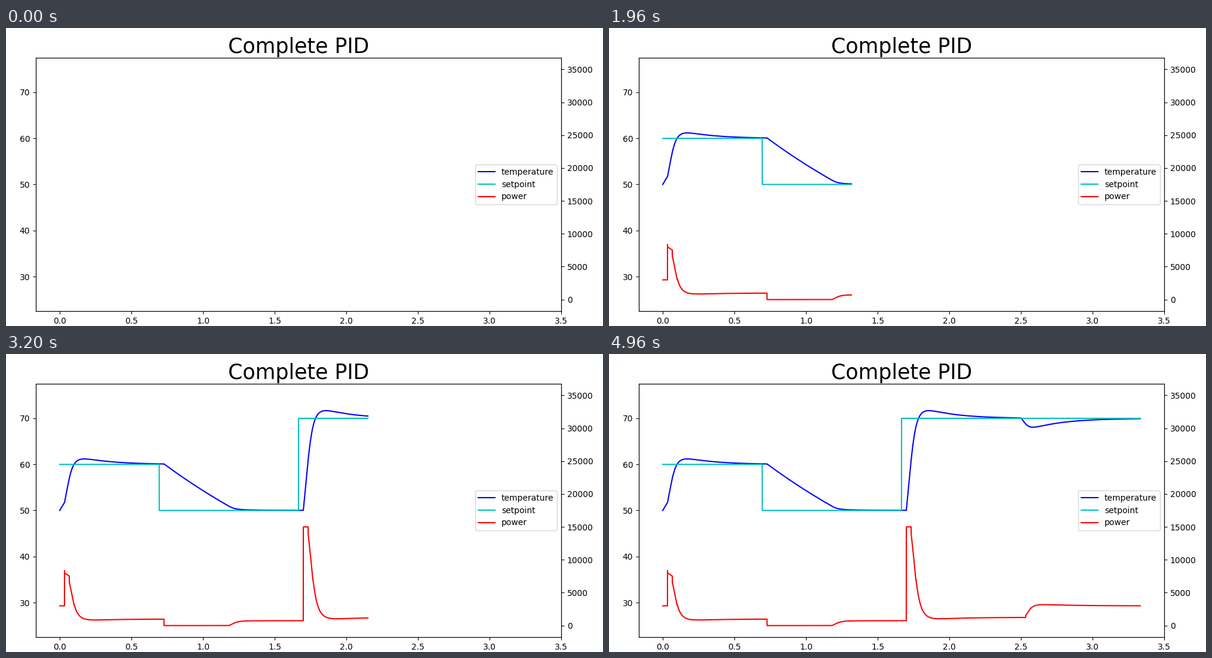
Recreate the animation shown at these times as a matplotlib script. Size 1000 by 500 pixels, loop 5 s.

```python
import numpy as np
import matplotlib.pyplot as plt
from matplotlib.animation import FuncAnimation

FRAMES, INTERVAL = 125, 40
DURATION, DELAY = 12000, 120  # seconds
KP, KI, KD = 790.0, 0.79, 27000.0
START_INTEGRAL, START_POWER, MAX_POWER = 480.0, 3000.0, 15000.0
HEAT_CAPACITY, AMBIENT = 157000.0, 20.0


def setpoint_at(t):
    return 60 if t < 2500 else 50 if t < 6000 else 70


def loss_at(t):
    return 25 if t < 9000 else 60


def simulate():
    """Heated tank with a delayed PID output and conditional integration."""
    temperature = np.full(DURATION + 1, 50.0)
    power = np.full(DURATION + DELAY + 1, START_POWER)
    integral = START_INTEGRAL
    for t in range(DURATION + 1):
        temp = temperature[t]
        error = setpoint_at(t) - temp
        slope = temp - temperature[t - 1] if t else 0.0
        command = KP * error + integral - KD * slope
        power[t + DELAY] = np.clip(command, 0, MAX_POWER)
        if 0 < command < MAX_POWER:
            integral += KI * error
        if t < DURATION:
            heat = power[t] - loss_at(t) * (temp - AMBIENT)
            temperature[t + 1] = temp + heat / HEAT_CAPACITY
    return temperature, power[:DURATION + 1]


seconds = np.arange(DURATION + 1)
hours = seconds / 3600
temperature, power = simulate()
setpoint = np.array([setpoint_at(t) for t in seconds])

fig, ax = plt.subplots(figsize=(10, 5), dpi=100)
fig.subplots_adjust(left=0.05, right=0.93, bottom=0.05, top=0.9)
power_ax = ax.twinx()
ax.set_title("Complete PID", fontsize=25)
ax.set_xlim(-1 / 6, 3.5)
ax.set_ylim(22.5, 77.5)
power_ax.set_ylim(-1750, 36750)

lines = [
    ax.plot([], [], "b", label="temperature")[0],
    ax.plot([], [], "c", label="setpoint")[0],
    power_ax.plot([], [], "r", label="power")[0],
]
power_ax.legend(handles=lines, loc="center right")


def update(frame):
    shown = round(frame * DURATION / (FRAMES - 1)) + 1 if frame else 0
    for line, values in zip(lines, (temperature, setpoint, power)):
        line.set_data(hours[:shown], values[:shown])
    return lines


anim = FuncAnimation(fig, update, frames=FRAMES, interval=INTERVAL,
                     repeat=True, repeat_delay=0)
plt.show()
```
